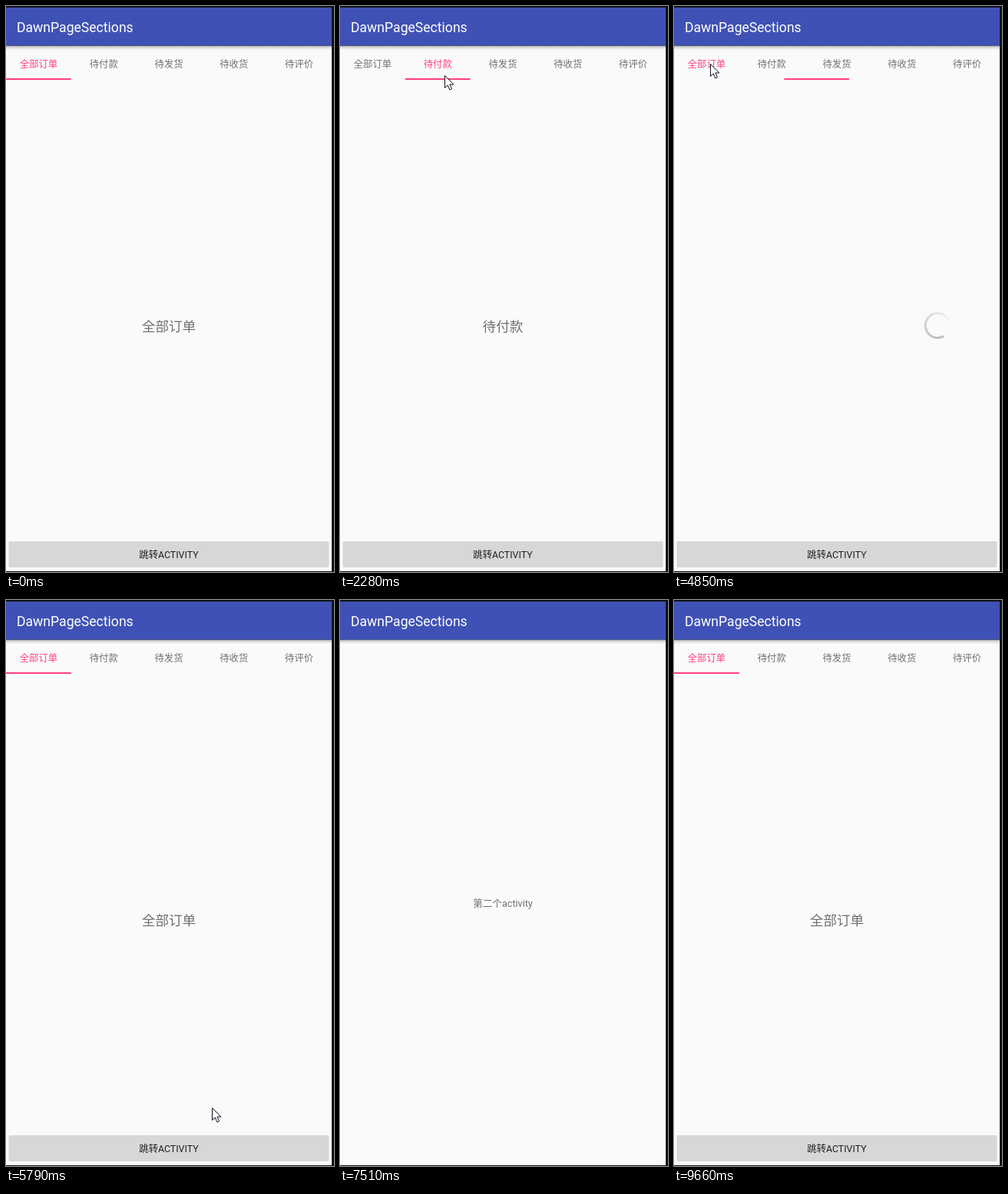
These frames come from a looping animation (427 px wide and 736 px high, 9970 ms). An HTML page with a canvas:

```html
<!DOCTYPE html>
<html lang="zh-CN">
<head>
<meta charset="utf-8">
<title>Tabs</title>
<style>
  html, body { margin: 0; width: 100%; height: 100%; overflow: hidden; background: #101316; }
  canvas { display: block; }
</style>
</head>
<body>
<canvas id="stage" width="427" height="736"></canvas>
<script>
const ctx = document.getElementById('stage').getContext('2d');
const LOOP = 9970, WIDTH = 424, TOP = 2, BOTTOM = 735, BAR = 51.5;
const TITLE = 'DawnPageSections';
const TABS = ['全部订单', '待付款', '待发货', '待收货', '待评价'];
const TAB_WIDTH = WIDTH / TABS.length;
const FAMILY = 'Roboto, "Noto Sans CJK SC", "Noto Sans CJK", sans-serif';
const GREY = '#707070', PINK = '#ff4081', PAPER = '#fafafa';

const CLICKS = [{ at: -LOOP, tab: 0 }, { at: 900, tab: 1 }, { at: 3000, tab: 3 }, { at: 4700, tab: 0 }];
const SLIDE = 330, LOAD = 1000;
const OPEN = 6650, OPEN_TIME = 300, CLOSE = 8220;

// Pointer stops: arrival time, x, y; each trip takes at most TRAVEL
const TRAVEL = 450;
const STOPS = [
  [0, -14, 300], [900, 118, 76], [1750, 78, 98], [2280, 136, 90], [3000, 290, 76], [3600, 52, 95],
  [4020, 47, 75], [5790, 268, 660], [6750, 262, 715], [7450, 428, 738], [9540, 406, 732], [9660, 406, 738]
];
const ARROW = new Path2D('M0 0V16L3.7 12.5L6.4 18.5L9 17.3L6.4 11.5H11.4Z');

const clamp = v => Math.max(0, Math.min(1, v));
const smooth = v => v * v * (3 - 2 * v);
const mix = (a, b, k) => a + (b - a) * k;

function rect(x, y, w, h, color) {
  ctx.fillStyle = color;
  ctx.fillRect(x, y, w, h);
}

function text(str, x, y, size, color, align = 'center', weight = 400) {
  ctx.font = `${weight} ${size}px ${FAMILY}`;
  ctx.textAlign = align;
  ctx.fillStyle = color;
  ctx.fillText(str, x, y);
}

function toolbar() {
  rect(0, TOP, WIDTH, BAR - TOP, '#3f51b5');
  const shade = ctx.createLinearGradient(0, BAR, 0, BAR + 6);
  shade.addColorStop(0, 'rgba(0,0,0,.35)');
  shade.addColorStop(0.4, 'rgba(0,0,0,.12)');
  shade.addColorStop(1, 'rgba(0,0,0,0)');
  rect(0, BAR, WIDTH, 6, shade);
  text(TITLE, 14, 34, 17.6, '#fff', 'left');
}

function spinner(x, y, t) {
  const head = 2.7 - (t - 3600) / 1000 * Math.PI * 2;
  const fade = ctx.createConicGradient(head - 0.2, x, y);
  fade.addColorStop(0, 'rgba(0,0,0,.25)');
  fade.addColorStop(0.3, 'rgba(0,0,0,.19)');
  fade.addColorStop(0.85, 'rgba(0,0,0,0)');
  ctx.strokeStyle = fade;
  ctx.lineWidth = 3;
  ctx.lineCap = 'round';
  ctx.beginPath();
  ctx.arc(x, y, 16, head, head + Math.PI * 1.6);
  ctx.stroke();
}

function mainScreen(t) {
  const step = CLICKS.findLastIndex(click => t >= click.at);
  const { at, tab } = CLICKS[step];
  const previous = CLICKS[Math.max(0, step - 1)].tab;
  const position = mix(previous, tab, smooth(clamp((t - at) / SLIDE)));
  const loading = t < at + LOAD || (t >= OPEN && t < CLOSE + LOAD);

  rect(0, BAR, WIDTH, BOTTOM - BAR, PAPER);
  toolbar();
  TABS.forEach((name, i) => {
    text(name, (i + 0.5) * TAB_WIDTH, 79.5, 12.36, i === tab ? PINK : GREY);
    const x = (i - position + 0.5) * WIDTH;
    const ready = i === tab ? !loading : i === previous;
    if (ready) text(name, x, 422.5, 17.6, GREY);
    else spinner(x, 415.5, t);
  });
  rect(position * TAB_WIDTH, 94, TAB_WIDTH, 2, PINK);

  ctx.fillStyle = '#d6d7d7';
  ctx.beginPath();
  ctx.roundRect(3.5, 696, 417, 34, 2);
  ctx.fill();
  text('跳转', 198, 718, 12.36, '#212121', 'right', 500);
  text('ACTIVITY', 198, 718, 12.36, '#212121', 'left');
}

function secondScreen(shown) {
  const scale = mix(0.8, 1, shown), cx = WIDTH / 2, cy = (TOP + BOTTOM) / 2;
  rect(0, TOP, WIDTH, BOTTOM - TOP, `rgba(0,0,0,${0.57 * shown})`);
  ctx.save();
  ctx.globalAlpha = shown;
  ctx.translate(cx, cy);
  ctx.scale(scale, scale);
  ctx.translate(-cx, -cy);
  rect(0, BAR, WIDTH, BOTTOM - BAR, PAPER);
  toolbar();
  text('第二个activity', cx, 398.5, 12.6, GREY);
  ctx.restore();
}

function pointer(t) {
  const next = STOPS.findIndex(stop => stop[0] > t);
  if (next < 0) return;
  const [left, x0, y0] = STOPS[next - 1], [arrive, x1, y1] = STOPS[next];
  const start = Math.max(left, arrive - TRAVEL);
  const k = smooth(clamp((t - start) / (arrive - start)));
  ctx.save();
  ctx.translate(Math.round(mix(x0, x1, k)) + 0.5, Math.round(mix(y0, y1, k)) + 0.5);
  ctx.fillStyle = '#fff';
  ctx.fill(ARROW);
  ctx.strokeStyle = '#101020';
  ctx.lineWidth = 1;
  ctx.stroke(ARROW);
  ctx.restore();
}

function draw(t) {
  rect(0, 0, 427, 736, '#101316');
  ctx.save();
  ctx.beginPath();
  ctx.rect(0, TOP, WIDTH, BOTTOM - TOP);
  ctx.clip();
  mainScreen(t);
  if (t >= OPEN && t < CLOSE) secondScreen(1 - (1 - clamp((t - OPEN) / OPEN_TIME)) ** 5);
  ctx.restore();
  pointer(t);
}

const began = performance.now();
function tick() {
  draw((performance.now() - began) % LOOP);
  requestAnimationFrame(tick);
}
tick();
</script>
</body>
</html>
```
